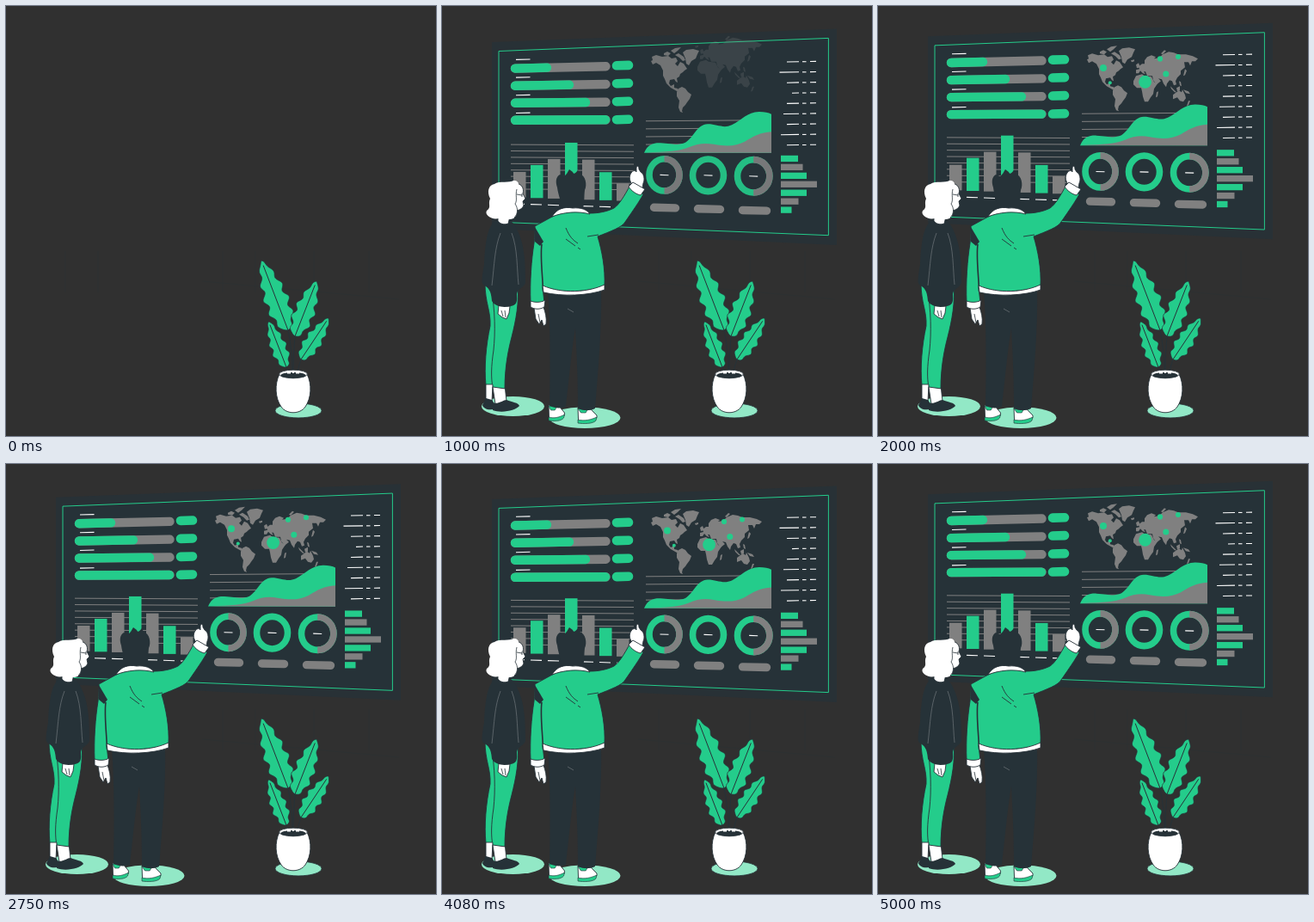
These frames come from a looping animation (500 by 500 pixels, 5.04 s). An HTML page with a canvas:

```html
<!DOCTYPE html>
<html lang="en">
<head>
<meta charset="utf-8">
<title>Dashboard presentation</title>
<style>
html, body { margin: 0; width: 100%; height: 100%; overflow: hidden; background: #303030; }
canvas { display: block; width: 100%; height: 100%; }
</style>
</head>
<body>
<canvas id="stage"></canvas>
<script>
const LOOP = 5040, SIZE = 500;
const BG = '#303030', GREEN = '#24cc8b', GREY = '#808080', NAVY = '#263238',
      WHITE = '#fff', INK = NAVY, MINT = '#92e8c6', FOLD = '#70787b', FAINT = '#2d3032';

const dpr = window.devicePixelRatio || 1;
const makeCanvas = el => {
  el.width = el.height = SIZE * dpr;
  return el.getContext('2d');
};
const screen2d = makeCanvas(document.getElementById('stage'));
const buffer2d = makeCanvas(document.createElement('canvas'));
let c = screen2d;

// ---- drawing helpers ----
function shape(d, fill, line, width = 0.9) {
  const p = new Path2D(d);
  if (fill) { c.fillStyle = fill; c.fill(p); }
  if (line) { c.strokeStyle = line; c.lineWidth = width; c.stroke(p); }
}
function line(x1, y1, x2, y2, color, width = 1, cap = 'butt') {
  c.beginPath();
  c.moveTo(x1, y1);
  c.lineTo(x2, y2);
  c.strokeStyle = color;
  c.lineWidth = width;
  c.lineCap = cap;
  c.stroke();
  c.lineCap = 'butt';
}
function oval(x, y, rx, ry, fill, stroke) {
  c.beginPath();
  c.ellipse(x, y, rx, ry, 0, 0, 2 * Math.PI);
  c.fillStyle = fill;
  c.fill();
  if (stroke) { c.strokeStyle = stroke; c.lineWidth = 0.8; c.stroke(); }
}
function ring(x, y, rx, ry, from, to, color) {
  c.beginPath();
  c.ellipse(x, y, rx, ry, 0, from, to);
  c.strokeStyle = color;
  c.lineWidth = 7.6;
  c.stroke();
}

// Draws a group as one flattened layer.
function layer(alpha, dx, dy, draw) {
  alpha = Math.max(0, Math.min(1, alpha));
  if (alpha === 0) return;
  const flat = alpha < 1;
  if (flat) {
    c = buffer2d;
    c.setTransform(1, 0, 0, 1, 0, 0);
    c.clearRect(0, 0, SIZE * dpr, SIZE * dpr);
  }
  c.setTransform(dpr, 0, 0, dpr, dx * dpr, dy * dpr);
  draw();
  c = screen2d;
  c.setTransform(dpr, 0, 0, dpr, 0, 0);
  if (flat) {
    c.globalAlpha = alpha;
    c.drawImage(buffer2d.canvas, 0, 0, SIZE, SIZE);
    c.globalAlpha = 1;
  }
}

// ---- motion ----
function bezier(x, x1, y1, x2, y2) {
  if (x <= 0) return 0;
  if (x >= 1) return 1;
  const at = (s, a, b) => 3 * s * (1 - s) * ((1 - s) * a + s * b) + s * s * s;
  let lo = 0, hi = 1;
  for (let i = 0; i < 24; i++) {
    const mid = (lo + hi) / 2;
    if (at(mid, x1, x2) < x) lo = mid; else hi = mid;
  }
  return at(lo, y1, y2);
}
const enter = (t, delay = 0) => bezier((t - delay) / 1000, 0.36, -0.01, 0.5, 1.38);
const slide = p => -30 * (1 - p);
function bob(t) {
  if (t < 1000) return 0;
  const k = ((t - 1000) % 1500) / 1500;
  return -10 * (1 - Math.abs(2 * k - 1));
}

// ---- board ----
function panel() {
  shape('M58 42L459 26.5V278L58 259Z', '#283136');
  shape('M66 52.5L449.4 37.4V266.7L66 251.3Z', NAVY, GREEN, 1);
}
function progress() {
  const rows = [[72.6, 70.2, 69.2, 127], [92.8, 91, 90.1, 153], [112.8, 111.8, 111.1, 172], [132.8, 132.3, 132.1, 195]];
  rows.forEach(([y1, y2, pillY, end], i) => {
    const yEnd = y1 + (y2 - y1) * (end - 85) / 110;
    line(85, y1, 190.5, y2, GREY, 10.4, 'round');
    line(85, y1, end - 5, yEnd, GREEN, 10.4, 'round');
    line(203, pillY + 0.1, 217, pillY - 0.3, GREEN, 10.6, 'round');
    line(86, 62.4 + i * 20.7, 102.5, 62 + i * 20.7, WHITE, 1.1);
  });
}
function columns() {
  for (let i = 0; i < 8; i++) line(80, 159.5 + i * 7.4, 223, 160.2 + i * 7.4, GREY, 1);
  const tops = [191.3, 183.3, 176.3, 157.3, 177, 191.6, 204.6];
  tops.forEach((top, i) => {
    const x = 83 + i * 20, base = 221 + i * 0.65;
    c.fillStyle = i % 2 ? GREEN : GREY;
    c.fillRect(x, top, 14.5, base - top);
    line(x, 228.4 + i * 0.65, x + 13, 228.8 + i * 0.65, WHITE, 1.1);
  });
}
function area() {
  for (let i = 0; i < 4; i++) line(237, 131.9 + i * 9.1, 383, 130.8 + i * 9.1, GREY, 1);
  shape('M235 168.8C239 159 246 157 254 157.3C268 158 274 161 283 157C293 151 296 136 309 135.5C320 135.5 327 141 337 136.5C349 131 355 121 369 121.2Q378 121.2 383 123.8V169Z', GREEN);
  shape('M237 168.6C262 168 276 167 287 162.5C297 158 306 157 316 159C332 162 342 161 352 156C362 150 370 145 383 144.5V169Z', GREY);
}
function donuts() {
  const top = -Math.PI / 2, low = Math.PI / 2;
  [[258.5, 199.1, 17.5, 18.6], [309.5, 199.5, 18, 18.8], [362.2, 200.5, 18.7, 19.2]].forEach(([x, y, rx, ry], i) => {
    ring(x, y, rx, ry, 0, 2 * Math.PI, GREEN);
    if (i !== 1) ring(x, y, rx, ry, top, low, GREY);
    line(x - 5, y, x + 5, y + 0.3, WHITE, 1.1);
  });
}
function pills() {
  [[246.5, 271.5, 233.8], [297.5, 323.5, 235.3], [349.5, 377.5, 237]].forEach(([a, b, y]) =>
    line(a, y, b, y + 0.6, GREY, 9.4, 'round'));
}
function labels() {
  [401, 392.5, 401, 407, 401, 397, 401, 394, 401].forEach((x, i) => {
    const y = 63.1 + i * 12.1;
    line(x, y + 0.3, 415, y, WHITE, 1.1);
    line(419, y, 423.5, y, WHITE, 1.1);
    line(428, y - 0.2, 435, y - 0.3, WHITE, 1.1);
  });
}
function sideBars() {
  [20, 25.5, 30, 42, 30, 20.5, 12.5].forEach((w, i) => {
    c.fillStyle = i % 2 ? GREY : GREEN;
    c.fillRect(394, 173.8 + i * 9.95, w, 7.3);
  });
}

// ---- world map ----
function westMap() {
  shape('M243 69L245 68L244 64L249 62L256 64L263 63L267 66L272 65L274 69L271 72L274 75L277 70L281 72L285 78L282 80L280 82L277 84L276 87L273 89L274 94L272 93L270 90L265 91L264 95L266 98L270 96L270 100L274 101L276 104L273 104L266 100L261 95L259 90L257 86L257 80L254 74L249 71L245 73Z', GREY);
  shape('M258 60l4-2 4 2-3 3-5-1zM266 57l5-3 7-1-4 4-4 3zM271 62l4-2 6 4 2 4-3 1-4-4z', GREY);
  shape('M280 59L284 56L292 55L299 57L297 61L295 66L290 69L287 74L284 72L283 66Z', GREY);
  shape('M275 101L279 99L283 101L286 105L290 108L288 113L285 117L283 120L280 123L279 127L280 129L277 128L275 123L276 115L273 110L273 105Z', GREY);
}
function eastMap() {
  shape('M300 88L307 86L310 88L318 89L321 95L325 97L321 103L320 109L317 113L314 118L310 118L308 112L307 106L306 102L301 102L297 98L297 94Z', GREY);
  shape('M300 85L300 81L304 80L303 77L307 74L310 74L310 70L313 66L318 64L323 66L321 68L327 67L331 63L338 60L344 61L349 63L358 63L366 65L372 68L369 71L365 71L363 76L361 72L356 72L357 78L352 82L352 86L348 90L346 94L347 98L344 99L342 94L339 93L336 97L335 101L332 97L330 92L326 91L329 94L324 98L320 93L319 88L313 88L311 83L309 83L311 86L308 85L305 82L303 85Z', GREY);
  shape('M300 75l3-2 2 5-4 1zM294 70l4-1v2l-3 1zM324 107l2-1-1 6-2 1zM357 80l2 2-2 5-2 1 1-4zM329 62l4-4 2 1-4 4zM350 94l2 1 1 5-2-1z', GREY);
  shape('M340 100l4 4 3 3-2 0-4-4zM347 102l4-2 0 5-3 1zM355 104l6 2 2 3-5-1z', GREY);
  shape('M343 110L347 107L350 105L353 107L354 104L357 110L358 114L355 118L351 117L348 113L343 115Z', GREY);
  shape('M361 117l2 0-2 5-2 1z', GREY);
}
function markers() {
  [[262, 78.7, 4], [269.8, 95.8, 2], [310.6, 94.9, 7.4], [328, 68.1, 3.1], [349, 65.7, 3], [334.8, 85.7, 3.5]]
    .forEach(([x, y, r]) => oval(x, y, r, r, GREEN));
}
const boardParts = [
  [0, panel], [0, progress], [100, columns], [0, sideBars], [100, labels], [200, area],
  [300, pills], [400, donuts], [450, westMap], [750, eastMap], [1000, markers]
];

// ---- people ----
function woman() {
  oval(82.5, 465.5, 36.5, 11.5, MINT);
  shape('M50 322C50 345 57 355 56 372C51 395 49 420 51 441H59L70 380V322Z', GREEN, INK);
  shape('M57 326C62 355 62 380 60 400C57 420 57 432 59 444L73 445C73 420 77 400 81 385C86 365 90 345 88 322Z', GREEN, INK);
  shape('M51 440H59L58 460H51Z', WHITE, INK);
  shape('M59 443L73.5 445L75 460L62 463Z', WHITE, INK);
  shape('M51 456L58 458L62 464L59 469C53 470 48 468 47 464C48 461 50 459 51 456Z', NAVY);
  shape('M59 461C65 464 71 458 75 458C82 461 89 461 90 465C86 470 70 474 59 470Z', NAVY);
  shape('M66 348L79 349L78 357L75 364L70 362L65 358Z', WHITE, INK);
  shape('M69 354L71 361M73 354L74 362', null, INK, 0.8);
  shape('M62 250C52 256 50 280 49 300C46 318 46 322 48 324C54 328 57 330 58 343C62 350 72 351 80 349C86 348 88 345 87 335C88 328 95 328 97 322C97 300 96 285 92 272C88 258 82 250 77 248Z', NAVY);
  shape('M68 264C61 282 61 300 58 325M81 264C88 282 87 305 89 324', null, FOLD, 0.7);
  shape('M65 243L79 245L77 253C72 255 67 253 65 250Z', WHITE, INK);
  shape('M84 207C92 205 96 212 94 218L97 224L94 227L95 232C92 238 87 238 83 237Z', WHITE, INK);
  shape('M61 207C66 203 80 206 83 203C90 202 91 210 87 214C85 220 88 226 85 230C89 236 88 244 83 247C77 250 72 245 66 247C58 249 49 243 52 238C58 234 53 230 56 224C52 216 54 208 61 207Z', WHITE);
  shape('M87 213C85 220 88 226 85 230C89 236 88 242 84 246M87 219L93 220M93 218V222', null, INK, 0.8);
}
function shoe(x, y, w) {
  shape(`M${x} ${y}h${w * 0.6}l${w * 0.4} 9c1 5-5 7-${w * 0.55} 8h-${w * 0.42}z`, WHITE, INK);
  shape(`M${x} ${y + 1}h${w * 0.55}l-3 5h-${w * 0.25}z`, GREEN, INK, 0.6);
  shape(`M${x} ${y + 14}c${w * 0.35} 2 ${w * 0.7} 0 ${w} -3l-1 4c-3 4-${w * 0.65} 4-${w - 1} 3z`, GREEN, INK, 0.6);
}
function man() {
  oval(166, 478.7, 41.5, 12.3, MINT);
  shoe(124, 464, 18.5);
  shoe(158, 467, 22);
  shape('M123 331C126 370 126 420 125 465C132 468 138 468 144 466C148 430 152 390 155 375C157 410 158 440 158 468C165 471 172 471 178 468C182 420 186 370 185 330Z', NAVY);
  shape('M146 352L153 356', null, FOLD, 0.7);
  shape('M107 351L118 350C120 356 122 362 121 370L118 372L116 365L113 370L109 364Z', WHITE, INK);
  shape('M112 358L114 368', null, INK, 0.8);
  shape('M221 207C217 202 218 197 220 194C222 191 225 191 226 193L226 188C227 185 229 186 229 190L231 193C235 195 236 202 234 206L233 212Z', WHITE, INK);
  shape('M130 244L108 256C108 262 108 268 107 276C104 295 102 320 103 345H119L117 327C140 335 170 332 189 326C190 305 186 285 181 268C196 262 210 257 213 251C222 238 229 228 234 219L219 208C212 221 206 231 200 235C192 239 182 241 172 241C155 236 142 238 130 244Z', GREEN, INK);
  shape('M108 257L118 274L114 279L108 274Z', NAVY);
  shape('M116 277C114 292 117 312 117.5 332', null, INK, 1.6);
  shape('M144 258C148 268 152 272 158 276M144 271L155 279M158 281L161 283M169 268L182 266', null, INK);
  shape('M117 325C140 335 170 333 189 324V330C170 337 140 338 118 333Z', WHITE, INK);
  shape('M103 343C108 345 115 345 120 342L119 350C114 353 108 353 103 350Z', WHITE, INK);
  shape('M217 210L222 205L236 213L231 220C226 219 220 215 217 210Z', WHITE, INK);
  shape('M128 245C133 236 142 233 152 235C162 234 169 237 172 242C158 238 140 240 128 245Z', WHITE, INK);
  shape('M139 234C138 225 135 219 134 211C132 205 132 199 137 196L142 198C145 196 146 193 148 190L152 193C153 196 155 195 158 191L160 195C167 197 169 208 166 214C165 222 166 228 164 235C156 233 146 232 139 234Z', NAVY);
}

// ---- plant ----
function leaf(x, y, tipX, tipY, width, waves) {
  const dx = tipX - x, dy = tipY - y, len = Math.hypot(dx, dy);
  const nx = -dy / len, ny = dx / len;
  const edge = [1, -1].map(side => {
    const pts = [];
    for (let i = 0; i <= 60; i++) {
      const k = i / 60;
      const env = Math.sin(Math.PI * k ** 0.75) ** 0.65;
      const w = side * width * env * (1 + 0.19 * Math.sin(k * waves * 2 * Math.PI + side));
      pts.push([x + dx * k + nx * w, y + dy * k + ny * w]);
    }
    return pts;
  });
  c.beginPath();
  [...edge[0], ...edge[1].reverse()].forEach(p => c.lineTo(...p));
  c.closePath();
  c.fillStyle = GREEN;
  c.fill();
  c.strokeStyle = INK;
  c.lineWidth = 0.7;
  c.stroke();
  line(x, y, x + dx * 0.93, y + dy * 0.93, INK, 1);
}
function plant() {
  oval(340, 470.5, 27, 8.4, MINT, INK);
  shape('M328 377Q333 400 333 426M336 384Q334 405 334 426M326 420L329 427M343 411Q340 418 339 427', null, NAVY, 1);
  leaf(328, 377, 297, 296, 12.8, 5);
  leaf(336, 384, 361, 320, 11, 4.5);
  leaf(326, 420, 305.5, 367, 8.6, 4.5);
  leaf(343, 411, 375, 363, 9.2, 4.5);
  shape('M318 428C312 440 313 456 320 466C326 475 342 475 348 466C355 456 356 440 350 428Z', WHITE, INK);
  oval(334, 428, 16.3, 4.8, WHITE, INK);
  oval(334, 429.4, 14.6, 3.5, NAVY);
  shape('M327 424.5h4v3h-4zM333 424h2v3h-2zM337 424.5h4v3h-4z', WHITE);
}
function room() {
  [69, 107, 252, 290, 358, 422].forEach(x => line(x, 285, x, 333, FAINT));
  line(228, 320, 457, 341, FAINT);
}

// ---- frame ----
function render(t) {
  c = screen2d;
  c.setTransform(dpr, 0, 0, dpr, 0, 0);
  c.fillStyle = BG;
  c.fillRect(0, 0, SIZE, SIZE);
  room();

  const main = enter(t), lift = slide(main) + bob(t);
  for (const [delay, draw] of boardParts) {
    const p = delay ? enter(t, delay) : 1;
    layer(main * p, 0, lift + slide(p), draw);
  }
  plant();
  layer(main, slide(main), 0, () => { woman(); man(); });
}

const start = performance.now();
function tick() {
  render((performance.now() - start) % LOOP);
  requestAnimationFrame(tick);
}
tick();
</script>
</body>
</html>
```
